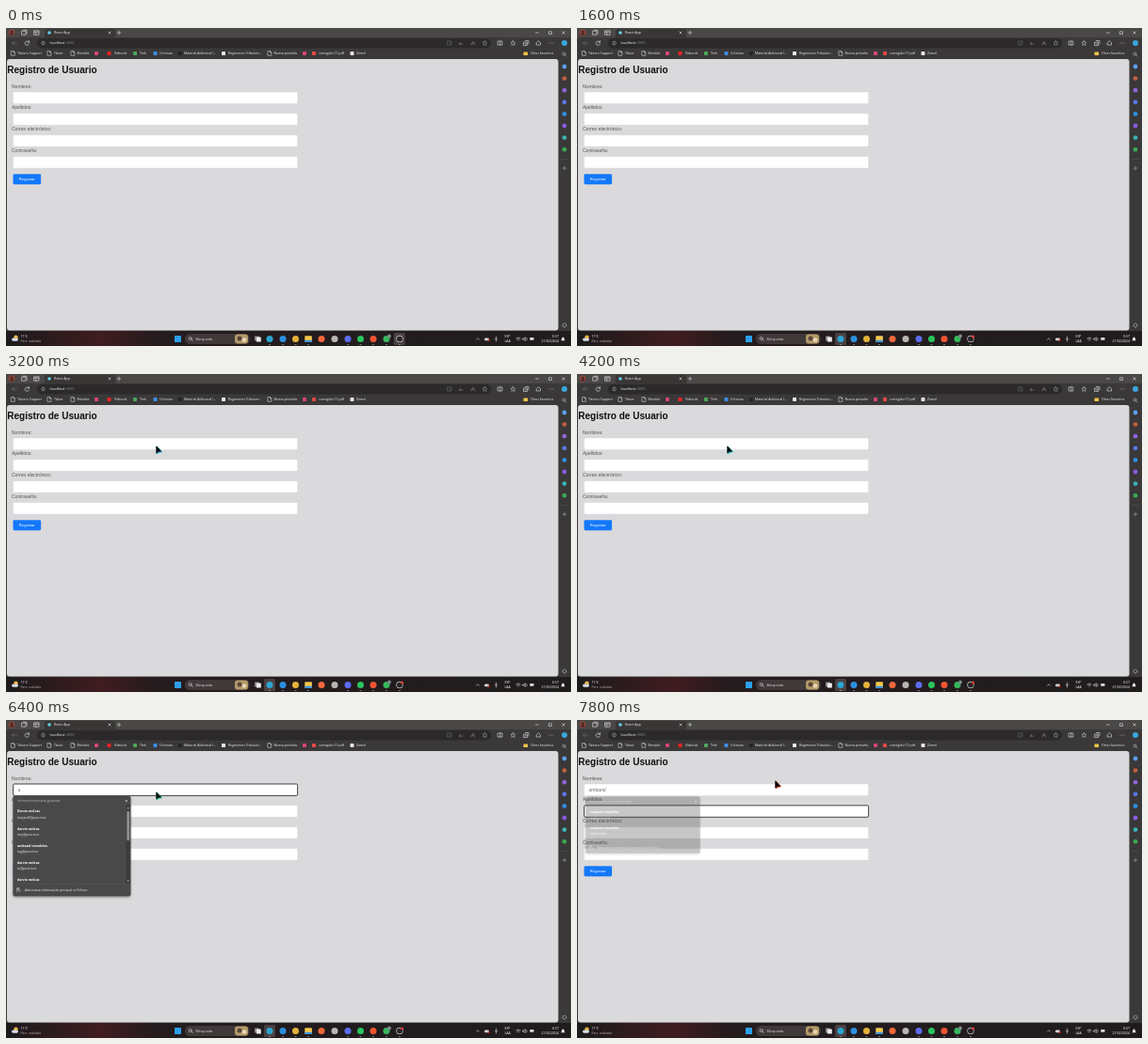
Write an HTML page that moves like this. It is 600 by 338 pixels and loops after 8000 ms.

```html
<!DOCTYPE html>
<html lang="es">
<head>
<meta charset="utf-8">
<title>React App</title>
<style>
html, body { margin: 0; width: 100%; height: 100%; overflow: hidden; background: #3a3838; }
svg { display: block; width: 100%; height: 100%; }
text { white-space: pre; }
.ui { font-family: "Open Sans", "Noto Sans", sans-serif; }
.web { font-family: "Liberation Sans", Arial, sans-serif; }
</style>
</head>
<body>
<svg id="stage" viewBox="0 0 600 338" preserveAspectRatio="none"></svg>
<script>
const LOOP = 8000, STEP = 200;

// Markup helpers
const rect = (x, y, w, h, fill, r = 0, more = '') =>
  `<rect x="${x}" y="${y}" width="${w}" height="${h}" rx="${r}" fill="${fill}" ${more}/>`;
const dot = (x, y, r, fill) => `<circle cx="${x}" cy="${y}" r="${r}" fill="${fill}"/>`;
const line = (d, color = '#e4e2e2', w = 0.6) =>
  `<path d="${d}" fill="none" stroke="${color}" stroke-width="${w}" stroke-linecap="round" stroke-linejoin="round"/>`;
const text = (x, y, s, size, fill = '#fff', more = '', cls = 'ui') =>
  `<text class="${cls}" x="${x}" y="${y}" font-size="${size}" fill="${fill}" ${more}>${s}</text>`;
const web = (x, y, s, size, fill, more) => text(x, y, s, size, fill, more, 'web');
const group = (id, body) => `<g id="${id}">${body}</g>`;
const cross = (x, y, r, color) =>
  line(`M${x - r} ${y - r}l${2 * r} ${2 * r}m0 ${-2 * r}l${-2 * r} ${2 * r}`, color);
const plus = (x, y, r, color) => line(`M${x - r} ${y}h${2 * r}M${x} ${y - r}v${2 * r}`, color);
const loupe = (x, y, color) =>
  line(`M${x + 1} ${y + 1}l1.5 1.5M${x + 1.4} ${y}a1.5 1.5 0 1 0 -3 0a1.5 1.5 0 1 0 3 0`, color);
const pageIcon = x => line(`M${x - 1.7} 24.6h2.2l1.3 1.3v3.4h-3.5zm2.2 0v1.3h1.3`, '#eee', 0.5);
const square = (x, y, s, fill, r = 0.8) => rect(x - s / 2, y - s / 2, s, s, fill, r);

const BOOKMARKS = [
  [7.5, 12, 'Talvoro Support'], [46, 51, 'Talvor'], [71, 75.5, 'Brindok'],
  [96, 0, '', '#d9437c'], [109.5, 115, 'Vidnook', '#ef2424'], [137, 142, 'Trek', '#4ca85a'],
  [158.5, 163, 'Crónicas', '#3f8de8'], [185, 189, 'Material Adicional (...', '#252424'],
  [231, 236, 'Regimenes Tributari...', '#e8e8e8'], [280, 284.5, 'Nueva pestaña'],
  [317, 0, '', '#d9437c'], [327, 332, 'corregido (1).pdf', '#e64a45'], [367.5, 372, 'Zomel', '#e9e4e2']
];
const SIDE = ['#5aa0ee', '#c0603f', '#9163d8', '#5b78e8', '#2f8fe0', '#8b5be0', '#3bb3b5', '#3aa852'];
const APPS = [
  [280, '#2ba4cf'], [294, '#2b8fe0'], [307.5, '#e3b23a'], [335, '#f2683a'], [349, '#b9b6b2'],
  [363, '#5c6cf0'], [376.5, '#27c45f'], [390, '#ee5631'], [404, '#36b85c']
];

function browser() {
  let s = rect(0, 0, 600, 338, '#3a3838') + rect(0, 0, 600, 10, '#4a4847');
  // Tab strip
  s += dot(6, 5, 3.4, '#8c4238') + dot(6, 4.1, 1.2, '#2c2222') + '<path d="M3.6 7.3q2.4-3.4 4.8 0z" fill="#2c2222"/>';
  s += line('M17 3.2h4v4h-4zM18 2.3h4v4') + line('M30 2.8h5v4.4h-5zM30 4.2h5M31.8 4.2v3');
  s += '<path d="M39 10.2q2 0 2-2V3q0-2 2-2h71q2 0 2 2v5.200q0 2 2 2z" fill="#393736"/>';
  s += dot(46, 5, 1.8, '#61cfe8') + text(51, 6.4, 'React App', 3.6, '#f0eeee');
  s += cross(110, 5, 1.1, '#ddd') + plus(120, 5, 1.8, '#ddd');
  s += line('M562.5 5h3M576.800 3.800h2.700v2.700h-2.700z') + cross(592, 5, 1.3);
  // Toolbar
  s += line('M11.500 16h-5l2-2m-2 2l2 2', '#777') + line('M24.200 15a2.200 2.200 0 1 0 .2 2M24.500 13.500v1.700h-1.700');
  s += rect(33, 11, 482, 10.4, '#2b2929', 5);
  s += '<circle cx="39.500" cy="16" r="1.900" fill="none" stroke="#bbb" stroke-width=".5"/>' + line('M39.500 16v.9M39.500 15v0', '#bbb', 0.5);
  s += text(46.5, 17.4, 'localhost<tspan fill="#8c8a8a">:3000</tspan>', 3.85, '#fff');
  s += line('M469 14h4v4h-4zM470.500 16h1', '#777', 0.5) + text(481, 17.5, 'A»', 4, '#8a8888');
  s += line('M494 18l2-4l2 4m-3.300-1.300h2.600', '#8a8888', 0.5);
  s += line('M508.500 13.600l.8 1.600l1.700.2l-1.300 1.200l.4 1.800l-1.600-.9l-1.600.9l.4-1.800l-1.300-1.200l1.700-.2z', '#aaa', 0.5);
  s += line('M522.500 14h4.400v4h-4.400zM524.700 14v4');
  s += line('M538.500 13.600l.8 1.600l1.700.2l-1.300 1.200l.4 1.800l-1.600-.9l-1.600.9l.4-1.800l-1.300-1.200l1.700-.2z', '#ddd', 0.5);
  s += line('M550 15h3.500v3.500h-3.500zM551.500 13.500h3.500v3.500M551 16.800h1.500');
  s += line('M563.500 15.500l2-1.800l2 1.800v2.500h-4z') + [577, 579, 581].map(x => dot(x, 16, 0.45, '#ddd')).join('');
  s += dot(593, 16, 3, '#3aa6dc');
  // Bookmarks bar
  for (const [ix, tx, label, color] of BOOKMARKS) {
    s += color ? square(ix, 27, 4, color) : pageIcon(ix);
    if (label) s += text(tx, 28.4, label, 3.5, '#f0eeee');
  }
  s += rect(549.5, 25.4, 4.6, 3.6, '#f0c34a', 0.5) + text(557, 28.4, 'Otros favoritos', 3.5, '#f0eeee');
  // Sidebar
  s += loupe(592.5, 27.5, '#ccc') + SIDE.map((c, i) => dot(593, 41 + i * 12.6, 2.4, c)).join('');
  s += line('M590 139.500h6', '#666', 0.4) + plus(593, 149, 1.8, '#aaa');
  s += '<circle cx="593" cy="316" r="1.900" fill="none" stroke="#ccc" stroke-width="1" stroke-dasharray="1 .5"/>';
  return s;
}

const fieldY = i => 68 + i * 22.85;
function page() {
  let s = rect(1, 33, 585.5, 288.5, '#dad9db', 3);
  s += web(1.2, 48.3, 'Registro de Usuario', 10.05, '#111', 'font-weight="700"');
  ['Nombres:', 'Apellidos:', 'Correo electrónico:', 'Contraseña:'].forEach((label, i) => {
    const y = fieldY(i);
    s += web(6, y - 4.4, label, 5, '#555');
    s += rect(7.6, y, 302, 12.4, '#fff', 1.3, `id="field${i}"`);
  });
  s += rect(7.5, 155.2, 29.6, 11, '#1378fa', 1.4);
  s += web(22.3, 162.2, 'Registrar', 4.17, '#fff', 'text-anchor="middle"');
  return s + web(12.5, 75.9, '', 5, '#666', 'id="typed"') + line('M12.300 71.300v5.600', '#777', 0.35).replace('<path', '<path id="caret"');
}

function taskbar() {
  let s = rect(0, 322, 600, 16, 'url(#bar)');
  s += dot(10.5, 328.6, 2.2, '#f0b445') + rect(6, 329.4, 7, 3.4, '#d5dde6', 1.7);
  s += text(15.5, 329.4, '11°C', 3.5) + text(15.5, 334.4, 'Parc. nublado', 3.4, '#bbb3b3');
  s += square(182.5, 330.5, 7, '#2ba0ea', 0.5);
  s += rect(190, 325, 69, 11, '#40393a', 5.5) + loupe(195.8, 330) + text(201.5, 331.8, 'Búsqueda', 3.8, '#e4dede');
  s += rect(243, 325.5, 14, 10, '#b59a68', 3) + dot(248, 330, 2.5, '#59453a') + dot(253, 331.5, 2.3, '#e6d8b8');
  s += rect(264, 327.5, 4.6, 5, '#8f8b8b', 0.5) + rect(266, 328.5, 4.8, 5, '#eee', 0.5);
  s += rect(274, 324, 12, 13, '#4a4142', 1.5, 'id="hotWeb"') + rect(411.8, 324, 12, 13, '#4a4142', 1.5, 'id="hotRec"');
  s += APPS.map(([x, c]) => dot(x, 330.4, 3.5, c)).join('');
  s += rect(317.3, 327.2, 7.6, 6.8, '#f4c84c', 0.8) + rect(317.3, 331.8, 7.6, 2.2, '#3c93dc', 0.4);
  s += [280, 294, 307.5, 321, 363, 376.5, 390, 404, 418].map(x => rect(x - 1, 336, 2, 0.7, '#a49c9c', 0.3)).join('');
  s += dot(407, 327.6, 2.1, '#6e7678') + text(407, 328.6, '2', 2.6, '#fff', 'text-anchor="middle"');
  s += dot(418, 330.4, 3.6, '#d8d5d5') + dot(418, 330.4, 3, '#272425');
  s += `<circle id="rec" cx="420.700" cy="328" r="1.600" fill="#e23535"/>`;
  s += line('M499.500 331.200l1.500-1.500l1.500 1.500') + rect(508, 329.5, 5, 2.8, '#d8d5d5', 1.4) + dot(512.5, 332, 1.1, '#d33');
  s += line('M520.500 328v2.500M519 330.500q1.500 2 3 0M520.500 331.600v1.400');
  s += text(532.5, 329.4, 'ESP', 3.5, '#fff', 'text-anchor="middle"') + text(532.5, 334.4, 'LAA', 3.5, '#fff', 'text-anchor="middle"');
  s += line('M541.800 329.800q2.200-2 4.400 0M542.800 331q1.200-1 2.400 0M544 332.200v0');
  s += line('M549 330h1l1.300-1.300v3.800l-1.300-1.300h-1zM552.800 329.500q1 1.200 0 2.400') + rect(556.3, 329, 4.2, 2.8, '#ddd', 0.5);
  s += text(587, 329.4, '0:57', 3.5, '#fff', 'text-anchor="end"') + text(587, 334.4, '21/02/2024', 3.5, '#fff', 'text-anchor="end"');
  return s + '<path d="M589.300 332.300q1-.8.800-2.200q.2-1.600 1.400-1.600t1.400 1.600q-.2 1.400.8 2.200z" fill="#e4e2e2"/>';
}

// Autofill suggestions: [name, mail]
const DARVIO = 'darvio melcas', UMBARAL = 'umbaral tonodelas';
const FIRST = [
  ['Darvio melcas', 'tonjarolf@post.test'], [DARVIO, 'tonj@post.test'], [UMBARAL, 'tog@post.test'],
  ['olmaro dondel', 'rud@post.test'], [DARVIO, '']
];
const TYPED = FIRST.map((p, i) => i === 3 ? [DARVIO, 'to@post.test'] : p);
const MATCH = [[UMBARAL, 'tog@post.test'], [UMBARAL, 'r@post.test']];

function popup(items) {
  const long = items.length > 2, h = long ? 106.5 : 62, end = 80.7 + h;
  let s = rect(7.5, 80.7, 124.8, h, '#494848', 2, 'stroke="#5f5d5d" stroke-width=".4" filter="url(#shade)"');
  s += text(12, 87.2, 'Información personal guardada', 3.1, '#bdbbbb') + cross(127.8, 86, 0.9, '#ddd');
  items.forEach(([name, mail], i) => {
    const y = 98.4 + i * 18.2;
    s += text(12, y, name, 3.4, '#fff', 'font-weight="700"') + text(12, y + 6.2, mail, 3.4, '#f1efef');
  });
  if (long) {
    s += rect(127.6, 90, 4.2, 84, '#3c3b3b') + rect(128.2, 97, 3, 31, '#8d8b8b', 0.3);
    s += '<path d="M128.700 94.200l1-1.400l1 1.400zM128.700 170.500l1 1.400l1-1.400z" fill="#ccc"/>';
  }
  s += line(`M7.700 ${end - 12.7}h124.400`, '#5e5c5c', 0.4);
  s += line(`M11.500 ${end - 4.7}q0-2 1.800-2M12 ${end - 8.5}h2v1.500h-2zM14 ${end - 4.700}l1.500-1`, '#eee', 0.5);
  return s + text(20, end - 5, 'Administrar información personal en Fichero', 3.2, '#f1efef');
}

const ARROW = 'M0 0V7.200L1.900 5.700L4.900 5.300Z';
const stage = document.getElementById('stage');
stage.innerHTML = `<defs>
  <linearGradient id="bar"><stop stop-color="#1d1b1d"/><stop offset=".07" stop-color="#2a1b1d"/>
  <stop offset=".17" stop-color="#401c20"/><stop offset=".27" stop-color="#241b1d"/><stop offset="1" stop-color="#201c1e"/></linearGradient>
  <filter id="shade" x="-10%" y="-10%" width="120%" height="125%"><feDropShadow dx="0" dy="1" stdDeviation="1.200" flood-opacity=".35"/></filter>
</defs>` + browser() + page() + taskbar() + group('first', popup(FIRST)) + group('second', popup(TYPED)) +
  group('match', popup(MATCH)) +
  group('cursor', `<path id="glow" d="${ARROW}" stroke-width="1.300" stroke-linejoin="round" transform="translate(.6 .6)"/><path d="${ARROW}" fill="#0c0c0e" stroke="#0c0c0e" stroke-width=".6"/>`);

const $ = id => document.getElementById(id);
const set = (id, attrs) => Object.entries(attrs).forEach(([k, v]) => $(id).setAttribute(k, v));
const show = (id, on) => set(id, { visibility: on ? 'visible' : 'hidden' });

// Smooth track through [time, ...values] points
function track(points, t) {
  let i = 0;
  while (i < points.length - 2 && t >= points[i + 1][0]) i++;
  const [a, b] = [points[i], points[i + 1]];
  const u = Math.min(1, Math.max(0, (t - a[0]) / (b[0] - a[0])));
  const e = u * u * (3 - 2 * u);
  return a.slice(1).map((v, k) => v + (b[k + 1] - v) * e);
}
const PATH = [[2200, 604, 150], [3000, 159.7, 76.8], [7400, 159.7, 76.8], [7800, 210.7, 64.8]];
const HUE = [[2200, 200], [3200, 192], [5200, 180], [6400, 160], [7800, 12]];
const KEYS = [6200, 6700, 6800, 6900, 7000, 7100, 7200];
const OPEN = 4800, NARROW = 6800, LEAVE = 7800;

function draw(t) {
  const focus = t < OPEN ? -1 : t < LEAVE ? 0 : 1;
  for (let i = 0; i < 4; i++)
    set('field' + i, i === focus ? { stroke: '#17171a', 'stroke-width': 0.8 } : { stroke: '#d0cfd2', 'stroke-width': 0.35 });

  const count = KEYS.filter(k => t >= k).length;
  $('typed').textContent = 'umbaral'.slice(0, count);
  show('caret', focus === 0 && count === 0 && (t - OPEN) % 1000 < 600);

  show('first', t >= OPEN && t < KEYS[0]);
  show('second', t >= KEYS[0] && t < NARROW);
  show('match', t >= NARROW);
  const fading = t >= LEAVE;
  set('match', { opacity: fading ? 0.3 : 1, transform: fading ? 'translate(70 111.700) scale(.972) translate(-70 -111.700)' : '' });

  show('hotRec', t < 200);
  show('hotWeb', t >= 200);
  show('rec', t >= 400);

  const [x, y] = track(PATH, t), [hue] = track(HUE, t);
  show('cursor', t >= PATH[0][0]);
  set('cursor', { transform: `translate(${x} ${y})` });
  set('glow', { fill: `hsl(${hue} 75% 45%)`, stroke: `hsl(${hue} 75% 45%)` });
}

const start = performance.now();
function tick() {
  const t = (performance.now() - start) % LOOP;
  draw(Math.floor(t / STEP) * STEP);
  requestAnimationFrame(tick);
}
tick();
</script>
</body>
</html>
```
